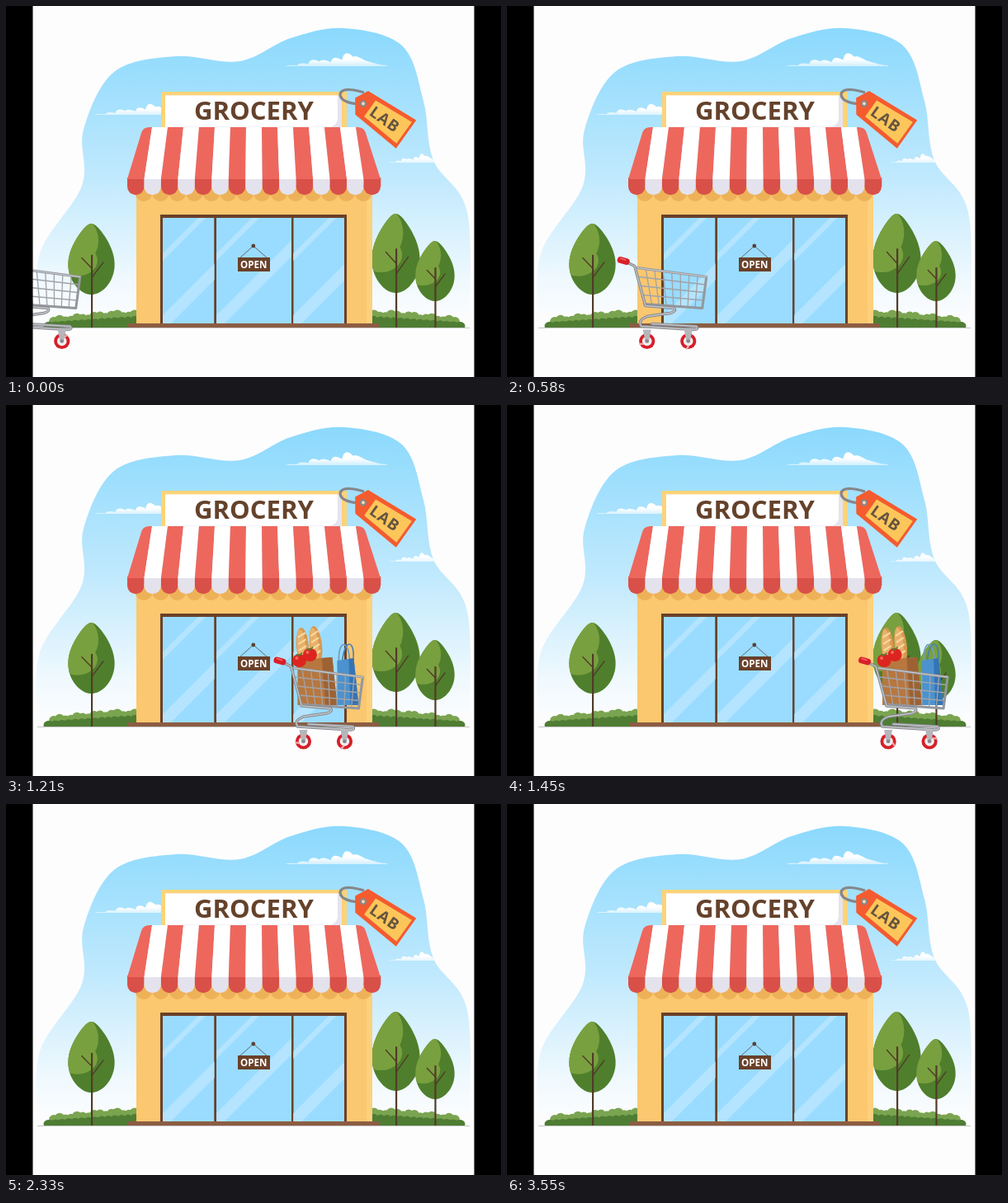
An HTML page with a canvas that plays this animation: 600x450 px, repeating every 3.58 s.

```html
<!DOCTYPE html>
<html lang="en">
<head>
<meta charset="utf-8">
<title>Grocery store</title>
<style>
  html, body { margin: 0; width: 100%; height: 100%; overflow: hidden; background: #000; }
  canvas { display: block; width: 600px; height: 450px; }
</style>
</head>
<body>
<canvas id="stage" width="600" height="450"></canvas>
<script>
const LOOP = 3580;
const FILL_TIME = 1100;
const FONT = '"Open Sans", "Noto Sans", sans-serif';
const PAPER = '#fefdfe', BROWN = '#6a4029', SHADOW = '#edb258', STEEL = '#a0a3a8';
const stage = document.getElementById('stage').getContext('2d');
let c = stage;

function rect(x, y, w, h, color) {
  c.fillStyle = color;
  c.fillRect(x, y, w, h);
}

function disc(x, y, rx, color, ry = rx) {
  c.fillStyle = color;
  c.beginPath();
  c.ellipse(x, y, rx, ry, 0, 0, Math.PI * 2);
  c.fill();
}

function trace(...points) {
  c.beginPath();
  points.forEach(([x, y]) => c.lineTo(x, y));
}

function poly(color, ...points) {
  trace(...points);
  c.fillStyle = color;
  c.fill();
}

function line(color, width, ...points) {
  trace(...points);
  c.strokeStyle = color;
  c.lineWidth = width;
  c.stroke();
}

function curve(d, color, width) {
  c.strokeStyle = color;
  c.lineWidth = width;
  c.stroke(new Path2D(d));
}

// Smooth open curve through key points.
function spline(p) {
  const at = i => p[Math.max(0, Math.min(p.length - 1, i))];
  c.beginPath();
  c.moveTo(...p[0]);
  for (let i = 0; i < p.length - 1; i++) {
    const [a, b, d, e] = [at(i - 1), at(i), at(i + 1), at(i + 2)];
    c.bezierCurveTo(b[0] + (d[0] - a[0]) / 6, b[1] + (d[1] - a[1]) / 6,
      d[0] - (e[0] - b[0]) / 6, d[1] - (e[1] - b[1]) / 6, ...d);
  }
}

function text(s, x, y, size, color) {
  c.font = `bold ${size}px ${FONT}`;
  c.textAlign = 'center';
  c.fillStyle = color;
  c.fillText(s, x, y);
}

function local(x, y, angle, draw) {
  c.save();
  c.translate(x, y);
  c.rotate(angle);
  draw();
  c.restore();
}

function clipped(draw) {
  c.save();
  c.clip();
  draw();
  c.restore();
}

// Flat-based cloud whose puffs peak at two places and fade downwards.
function cloud(x, y, w, h) {
  const g = c.createLinearGradient(0, y - h, 0, y + 2);
  g.addColorStop(0.5, '#fff');
  g.addColorStop(1, 'rgba(255,255,255,.45)');
  c.fillStyle = g;
  c.beginPath();
  const n = 9;
  c.moveTo(x, y);
  for (let i = 0; i < n; i++) {
    const u = (i + 0.5) / n;
    const peak = Math.max(1 - 3.2 * Math.abs(u - 0.61), 0.6 - 2.4 * Math.abs(u - 0.32), 0.08);
    c.quadraticCurveTo(x + (u - 0.3 / n) * w, y - h * peak * 1.15, x + (i + 1) / n * w, y - h * peak * 0.6);
  }
  c.lineTo(x + w, y);
  c.fill();
}

function sky() {
  const g = c.createLinearGradient(0, 27, 0, 388);
  g.addColorStop(0, '#8bd9fd');
  g.addColorStop(0.5, '#c0e9fd');
  g.addColorStop(0.85, '#f0f9fe');
  g.addColorStop(1, PAPER);
  spline([[38, 388], [41, 300], [92, 218], [94, 150], [131, 80], [205, 61], [283, 67],
    [345, 39], [410, 27], [480, 48], [506, 115], [518, 187], [559, 250], [562, 388]]);
  c.fillStyle = g;
  c.fill();
  clipped(() => {
    cloud(339, 73, 123, 19);
    cloud(108, 132, 110, 16);
    cloud(464, 190, 66, 13);
  });
}

// Two rows of leaves rising toward the store.
function bush(outer, dir) {
  c.beginPath();
  c.rect(38, 360, 524, 30);
  clipped(() => {
    for (let i = 0; i < 16; i++) {
      const rise = Math.min(7, i * 0.7) + 1.6 * Math.sin(i * 1.9);
      disc(outer + dir * (12 + i * 7), 383 - rise, 6, '#7aa450');
    }
    for (let i = 0; i < 14; i++) disc(outer + dir * (6 + i * 8), 388 - i * 0.25, 6.5, '#4e7d33', 5 + i * 0.3);
  });
}

function tree(x, y, w, h) {
  const m = w * 0.51;
  local(x, y, 0, () => {
    c.beginPath();
    for (let a = 0; a < 6.28; a += 0.1) {
      const bulge = 0.46 * Math.cos(a) + 0.055 * Math.sin(2 * a) + 0.025 * Math.cos(3 * a);
      c.lineTo(w * (0.5 + bulge), h * (0.5 + 0.5 * Math.sin(a)));
    }
    clipped(() => {
      rect(0, 0, w, h, '#4f7f2c');
      disc(w * 0.24, h * 0.24, w * 0.41, '#79a03f', h * 0.33);
      disc(w * 0.2, h * 0.52, w * 0.43, '#79a03f', h * 0.22);
    });
    line('#513b28', 2.2, [m, h * 0.44], [m, 390 - y]);
    line('#513b28', 1.4, [m, h * 0.76], [m + w * 0.25, h * 0.54]);
    line('#513b28', 1.4, [m, h * 0.63], [m - w * 0.22, h * 0.48]);
  });
}

function glare(sum, width) {
  poly('#b4e4ff', [sum - 250, 250], [sum + width - 250, 250], [sum + width - 390, 390], [sum - 390, 390]);
}

function pane(x, width) {
  c.beginPath();
  c.rect(x, 257, width, 128);
  clipped(() => {
    rect(x, 257, width, 128, '#99dcff');
    glare(x + 300, 9);
    glare(x + 375, 20);
  });
}

function door() {
  rect(187, 253, 226, 133, BROWN);
  pane(190, 62.5);
  pane(255, 91);
  pane(348.3, 61.7);
  line('#65666b', 1, [283, 306], [299.8, 291], [317, 306]);
  disc(299.8, 291, 2.4, '#5b4036');
  rect(281, 305, 39, 17, BROWN);
  text('OPEN', 300.2, 318, 11.6, '#fff');
}

function awning() {
  const count = 15, step = 307 / count, topStep = 19;
  for (let i = 0; i < count - 1; i++) disc(167 + i * step, 227, 10.2, SHADOW, 10);
  for (let i = 0; i < count; i++) {
    const x = 147 + i * step;
    const color = i % 2 ? '#e4e2ed' : '#d95049';
    rect(x, 208, step + 0.3, 11, color);
    disc(x + step / 2, 219, step / 2, color);
  }
  c.fill(new Path2D('M0 0'));
  c.beginPath();
  c.moveTo(147, 210);
  c.lineTo(164, 154);
  c.quadraticCurveTo(166, 147, 174, 147);
  c.lineTo(426, 147);
  c.quadraticCurveTo(434, 147, 436, 154);
  c.lineTo(454, 210);
  clipped(() => {
    for (let i = 0; i < count; i++) {
      const x = 147 + i * step, top = 300.5 + (i - count / 2) * topStep;
      poly(i % 2 ? '#fff' : '#ee675d', [top, 147], [top + topStep, 147], [x + step, 210], [x, 210]);
    }
  });
}

function tag() {
  curve('M433 118C421 120 405 116 405 107C407 98 424 102 434 105', '#85878a', 3.2);
  local(459, 137, 0.62, () => {
    poly('#f45b2f', [-36, -16], [32, -21], [32, 21], [-32, 16.5], [-44, 0]);
    poly('#fdc65a', [-22, -12], [29, -16], [29, 16], [-22, 12]);
    disc(-32, 0, 4.2, '#85878a');
    disc(-32, 0, 2, '#f6d8b7');
    c.letterSpacing = '1px';
    text('LAB', 0.5, 7, 19, '#655540');
    c.letterSpacing = '0px';
  });
}

function store() {
  rect(158, 215, 286, 171, '#fbc76f');
  rect(437, 225, 7, 161, '#fdd07c');
  rect(158, 225, 286, 4, SHADOW);
  rect(188, 104, 225, 47, '#fdd377');
  rect(193, 108.5, 214, 43, '#e5e3ee');
  c.fillStyle = '#fff';
  c.beginPath();
  c.roundRect(193, 108.5, 209, 38, [0, 0, 10, 0]);
  c.fill();
  text('GROCERY', 300.4, 138, 31.1, '#65422b');
  door();
  awning();
  rect(148, 385, 304, 5, '#8c5c43');
  tag();
}

function drawScene() {
  rect(0, 0, 600, 450, PAPER);
  sky();
  bush(46, 1);
  bush(556, -1);
  tree(75, 264, 57, 86);
  tree(443, 252, 59, 96);
  tree(496, 285, 48, 73);
  line('#c5c5c5', 1, [38, 390.5], [562, 390.5]);
  store();
}

// Cart coordinates are relative to the hub of the front wheel.
function bread(x, y, angle) {
  local(x, y, angle, () => {
    disc(0, 0, 7.5, '#d89850', 23);
    disc(-1.5, -1, 5, '#e8b16a', 20);
    for (let i = -2; i < 2; i++) line('#f7d8a0', 2.2, [-4, i * 8 + 4], [4, i * 8]);
  });
}

function tomato(x, y) {
  disc(x, y, 8.5, '#dc2520', 8);
  disc(x - 3, y - 3, 2, '#f36c56');
  line('#498136', 1.7, [x - 3, y - 7], [x, y - 6], [x + 3, y - 9]);
}

// A bag with a lit front and a darker side.
function bag(x, y, w, h, front, side) {
  poly(front, [x, y], [x + w, y - 3], [x + w + 6, y + h], [x, y + h]);
  poly(side, [x + w * 0.7, y - 2], [x + w, y - 3], [x + w + 6, y + h], [x + w * 0.8, y + h]);
}

function groceries() {
  bread(-51, -115, -0.08);
  bread(-35, -117, -0.12);
  bag(-57, -99, 42, 55, '#b7773f', '#9d6234');
  tomato(-55, -98);
  tomato(-42, -105);
  curve('M-7 -96C-8 -126 6 -123 6 -96', '#6f9fc2', 1.8);
  curve('M-3 -96C0 -128 14 -122 10 -96', '#4780b0', 1.6);
  bag(-9, -98, 20, 54, '#4b92ce', '#3574b5');
}

function wheel(x, angle) {
  disc(x, 0, 9.6, '#d51f29');
  disc(x, 0, 5.8, '#f0edee');
  local(x, 0, angle, () => line('#f3a9a6', 2.4, [0, -6], [2, -9]));
  poly('#b4b6ba', [x - 5, -14], [x + 5, -14], [x + 2, 1], [x - 2, 1]);
  disc(x, 0, 2.3, '#85888d');
}

const mix = (a, b, u) => [a[0] + (b[0] - a[0]) * u, a[1] + (b[1] - a[1]) * u];

function basket() {
  const [rimL, rimR, baseL, baseR] = [[-62, -89], [22, -78], [-53, -45], [17, -40]];
  for (let u = 0.125; u < 1; u += 0.125) line(STEEL, 1.3, mix(rimL, rimR, u), mix(baseL, baseR, u));
  for (let v = 0.25; v < 1; v += 0.25) line(STEEL, 1.3, mix(rimL, baseL, v), mix(rimR, baseR, v));
  line('#94979c', 3, rimL, rimR, baseR, baseL);
  line('#cdcfd2', 1.2, rimL, rimR);
}

function cart(x, y, full) {
  local(x, y, 0, () => {
    c.lineCap = c.lineJoin = 'round';
    if (full) groceries();
    basket();
    const chassis = 'M-75 -96L-65 -91L-52 -43L-17 -40Q-14 -36 -22 -34L-50 -30Q-62 -25 -57 -18L7 -14Q13 -14 10 -18L-44 -21';
    curve(chassis, '#85888d', 3.4);
    curve(chassis, '#c3c5c9', 1.3);
    line('#d91f2a', 8, [-82, -98.5], [-75, -96.5]);
    line('#f26963', 1.4, [-82, -100.5], [-76, -98.5]);
    wheel(-50, x / 10 + 1);
    wheel(0, x / 10);
  });
}

// Steady roll, speeding up after passing the door.
const cartX = s => 67.5 + 262 * s + 152 * Math.max(0, s - 0.8) ** 2;

const backdrop = document.createElement('canvas');
backdrop.width = 600;
backdrop.height = 450;
c = backdrop.getContext('2d');
drawScene();
c = stage;

function frame() {
  const t = performance.now() % LOOP;
  c.drawImage(backdrop, 0, 0);
  if (t < 2000) {
    const full = t >= FILL_TIME;
    cart(cartX(t / 1000), full ? 408 : 406.5, full);
  }
  rect(0, 0, 32.5, 450, '#000');
  rect(567.5, 0, 32.5, 450, '#000');
  requestAnimationFrame(frame);
}
frame();
</script>
</body>
</html>
```
